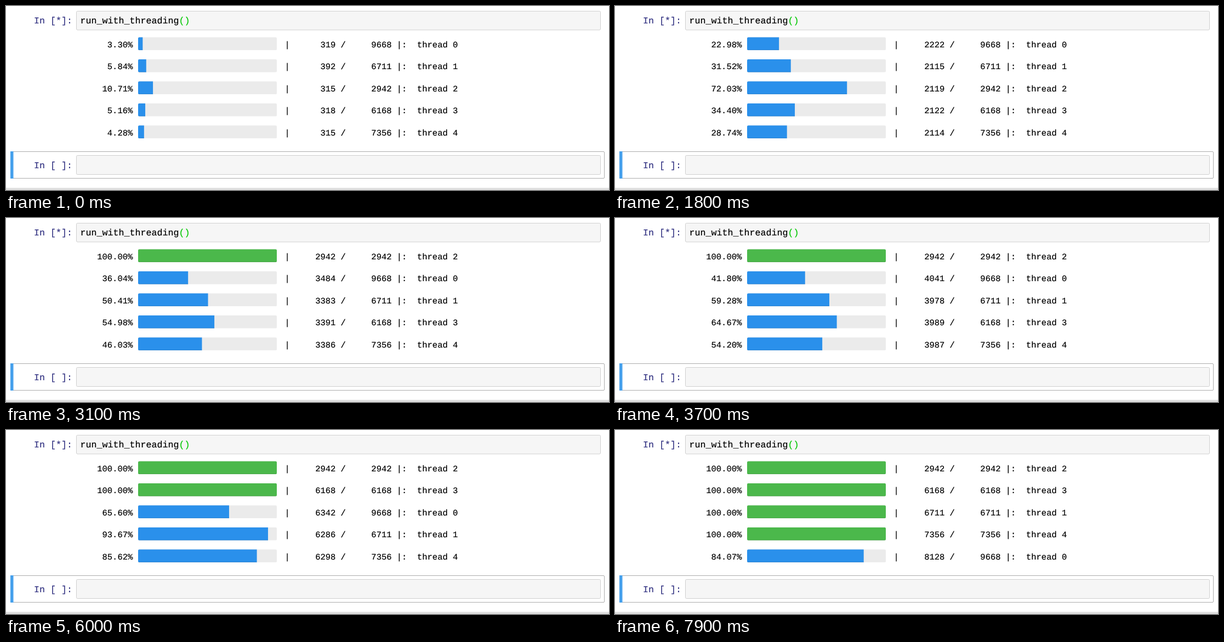
An HTML page for the animation above (8000 ms loop, 1100 px wide and 338 px high).

```html
<!DOCTYPE html>
<html lang="en">
<head>
<meta charset="utf-8">
<title>Threaded progress bars</title>
<style>
  html, body { margin: 0; width: 100%; height: 100%; overflow: hidden; background: #fff; }
  svg { display: block; width: 1100px; height: 338px; }
  text {
    font-family: "Liberation Mono", "Courier New", monospace;
    font-size: 15.49px; white-space: pre; text-rendering: geometricPrecision;
    fill: #000; stroke: #000; stroke-width: .2px;
  }
  .cell { font-size: 16.66px; }
  .prompt { fill: #303080; stroke: #303080; }
  .bracket { fill: #00c800; stroke: #00c800; }
  .input { fill: #f6f6f6; stroke: #cfcfcf; }
</style>
</head>
<body>
<svg id="stage" viewBox="0 0 1100 338">
  <defs>
    <clipPath id="track"><rect x="241" width="253" height="24" rx="2.5"/></clipPath>
    <pattern id="weave" width="2" height="2" patternUnits="userSpaceOnUse">
      <rect width="2" height="2" fill="#3292e6"/>
      <path d="M0 0h1v1h1v1h-1v-1h-1z" fill="#5aaef2"/>
    </pattern>
  </defs>
  <rect class="input" x="128.5" y="9.5" width="956" height="34.5" rx="2"/>
  <text class="cell prompt" x="51" y="32">In [*]:</text>
  <text class="cell" x="135.6" y="31.5">run_with_threading<tspan class="bracket">()</tspan></text>

  <rect x="8.5" y="267.5" width="1083" height="49" rx="1.5" fill="#fff" stroke="#ababab"/>
  <rect x="8" y="267" width="5.5" height="50" fill="url(#weave)"/>
  <rect class="input" x="128.5" y="274.5" width="956" height="35" rx="2"/>
  <text class="cell prompt" x="51" y="298.3">In [ ]:</text>
  <rect y="334" width="1100" height="4" fill="#e0e0e0"/>
</svg>
<script>
const LOOP = 8000, STEP = 100, BAR_WIDTH = 253;
const times = [0, 1100, 2500, 3700, 4900, 6000, 7900];
// Counts at the times above; values past a total are clamped.
const threads = [
  { total: 9668, counts: [319, 1517, 2926, 4041, 5213, 6342, 8128] },
  { total: 6711, counts: [392, 1443, 2787, 3978, 5159, 6286, 8090] },
  { total: 2942, counts: [315, 1450, 2787, 3980] },
  { total: 6168, counts: [318, 1452, 2792, 3989, 5175, 6300] },
  { total: 7356, counts: [315, 1442, 2785, 3987, 5171, 6298, 8120] }
];
const finishOrder = [2, 3, 1, 4, 0];

function add(parent, name, attributes) {
  const node = document.createElementNS("http://www.w3.org/2000/svg", name);
  for (const key in attributes) node.setAttribute(key, attributes[key]);
  return parent.appendChild(node);
}

const rows = threads.map((_, i) => {
  const row = add(stage, "g", { transform: `translate(0 ${57.3 + i * 40.5})` });
  const bar = add(row, "g", { "clip-path": "url(#track)" });
  add(bar, "rect", { x: 241, width: BAR_WIDTH, height: 24, fill: "#ebebeb" });
  return {
    fill: add(bar, "rect", { x: 241, height: 24 }),
    shade: add(bar, "rect", { x: 241, y: 23, height: 1, fill: "#000", "fill-opacity": .15 }),
    percent: add(row, "text", { x: 231.3, y: 18.3, "text-anchor": "end" }),
    label: add(row, "text", { x: 508.4, y: 18.3 })
  };
});

function countAt({ total, counts }, time) {
  let i = 0;
  while (i < counts.length - 2 && time > times[i + 1]) i++;
  const part = (time - times[i]) / (times[i + 1] - times[i]);
  return Math.min(total, Math.round(counts[i] + part * (counts[i + 1] - counts[i])));
}

function draw(time) {
  const values = threads.map(thread => countAt(thread, time));
  const isDone = id => values[id] === threads[id].total;
  const order = [
    ...finishOrder.filter(isDone),
    ...threads.keys()
  ].filter((id, i, all) => all.indexOf(id) === i);

  order.forEach((id, i) => {
    const { fill, shade, percent, label } = rows[i];
    const { total } = threads[id];
    const ratio = values[id] / total;
    fill.setAttribute("width", ratio * BAR_WIDTH);
    shade.setAttribute("width", ratio * BAR_WIDTH);
    fill.setAttribute("fill", isDone(id) ? "#4bb84b" : "#2a90eb");
    percent.textContent = (ratio * 100).toFixed(2) + "%";
    label.textContent =
      `|${String(values[id]).padStart(9)} / ${String(total).padStart(8)} |:  thread ${id}`;
  });
}

const start = performance.now();
function tick() {
  const elapsed = (performance.now() - start) % LOOP;
  draw(Math.floor(elapsed / STEP) * STEP);
  requestAnimationFrame(tick);
}
tick();
</script>
</body>
</html>
```
